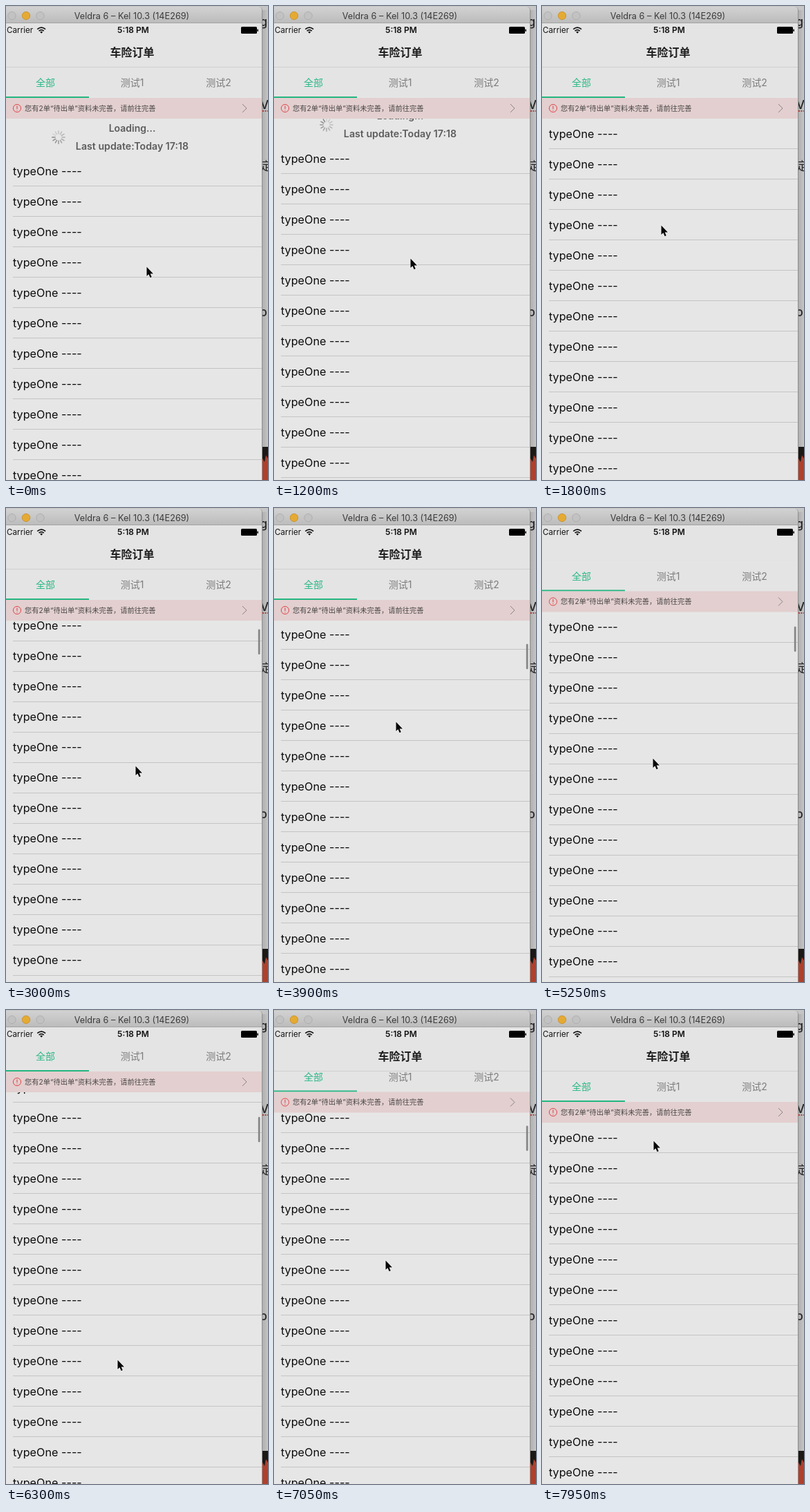
An HTML page that plays this animation: 379x686 px, repeating every 8 s.

```html
<!DOCTYPE html>
<html lang="zh">
<head>
<meta charset="utf-8">
<title>Order list</title>
<style>
html, body { margin: 0; width: 100%; height: 100%; overflow: hidden; background: #bdbdbd; }
svg { display: block; width: 100vw; height: 100vh; }
text { font-family: Inter, "Noto Sans CJK SC", "Noto Sans CJK", sans-serif; }
.mid { text-anchor: middle; }
.row { font-size: 16.2px; fill: #0c0c0c; }
.line { fill: #c4c4c4; }
.tab { font-size: 14px; fill: #7c7c7c; text-anchor: middle; }
.load { font-size: 14px; font-weight: 600; fill: #5c5c5c; text-anchor: middle; }
.behind { font-size: 17px; font-weight: 500; fill: #242424; }
</style>
</head>
<body>
<svg viewBox="0 0 379 686" preserveAspectRatio="none">
  <defs>
    <linearGradient id="bar" x2="0" y2="1">
      <stop stop-color="#d2d2d2"/><stop offset="1" stop-color="#bcbcbc"/>
    </linearGradient>
    <linearGradient id="shade">
      <stop stop-color="#acacac"/><stop offset="1" stop-color="#c5c5c5"/>
    </linearGradient>
  </defs>

  <!-- page behind the window -->
  <rect width="379" height="686" fill="#c5c5c5"/>
  <rect x="370" y="6" width="9" height="680" fill="url(#shade)"/>
  <g class="behind">
    <text x="367.5" y="29">ge</text>
    <text x="368" y="149">Vi</text>
    <text x="368" y="238">定</text>
    <text x="367.5" y="449">op</text>
  </g>
  <path d="M371 152H379" stroke="#c9382f" stroke-width="2" stroke-dasharray="2 1.5"/>
  <rect x="370" y="638" width="9" height="48" fill="#b0402c"/>
  <path d="M370 638H379V655L376 650L374 660L370 653Z" fill="#1c1815"/>

  <!-- window -->
  <path d="M0 1H365Q371 1 371 7V686H0Z" fill="#8f8f8f"/>
  <rect y="25" width="370" height="661" fill="#e6e6e6"/>

  <g id="head">
    <g id="spin"></g>
    <text class="load" x="182.5" y="128">Loading...</text>
    <text class="load" x="182.5" y="154" style="font-size:14.2px">Last update:Today 17:18</text>
  </g>
  <g id="labels"></g>
  <g id="lines"></g>
  <rect id="thumb" x="364.8" width="2.7" height="36.5" rx="1.3" fill="#858585"/>

  <rect y="25" width="370" height="64" fill="#e4e4e4"/>
  <g id="tabs">
    <rect y="88" width="370" height="45" fill="#e4e4e4"/>
    <text class="tab" x="57" y="116" style="fill:#2bb886">全部</text>
    <text class="tab" x="182.5" y="116">测试1</text>
    <text class="tab" x="307.5" y="116">测试2</text>
    <rect y="131" width="120" height="2" fill="#22b681"/>
    <rect y="133" width="370" height="30" fill="#e3cfcf"/>
    <circle cx="16" cy="148" r="5.6" fill="none" stroke="#e0484c"/>
    <path d="M16 144.6V149M16 150.4V151.6" stroke="#e0484c" stroke-width="1.1"/>
    <text x="27" y="151.8" font-size="10.25" fill="#4a4747">您有2单“待出单”资料未完善，请前往完善</text>
    <path d="M342 142L348 148L342 154" fill="none" stroke="#8b8383"/>
  </g>
  <g id="nav">
    <rect y="45" width="370" height="43" fill="#e4e4e4" fill-opacity=".95"/>
    <rect y="88" width="370" height="1" fill="#d0d0d0"/>
    <text class="mid" x="182.5" y="73" font-size="16" font-weight="700" fill="#1e1e1e">车险订单</text>
  </g>

  <!-- status bar -->
  <rect y="25" width="370" height="20" fill="#e4e4e4"/>
  <text x="1" y="39.4" font-size="11.7" fill="#151515">Carrier</text>
  <g fill="none" stroke="#111" stroke-width="1.7">
    <path d="M45.3 33.6Q51.2 28.6 57.1 33.6"/>
    <path d="M47.6 36.2Q51.2 33 54.8 36.2"/>
  </g>
  <path d="M49.2 37.6Q51.2 36 53.2 37.6L51.2 39.8Z" fill="#111"/>
  <text class="mid" x="184" y="39.4" font-size="12" font-weight="600" fill="#111">5:18 PM</text>
  <rect x="340" y="30" width="23" height="10" rx="1.5"/>
  <rect x="363.4" y="33.5" width="1.5" height="3.5" rx=".7"/>

  <!-- title bar -->
  <path d="M0 1H365Q370 1 370 6V24H0Z" fill="url(#bar)"/>
  <rect y="24" width="370" height="1" fill="#a3a3a3"/>
  <g stroke-width=".8">
    <circle cx="8.5" cy="14" r="5.7" fill="#c2c2c2" stroke="#a9a9a9"/>
    <circle cx="29" cy="14" r="5.7" fill="#e5aa32" stroke="#c68f27"/>
    <circle cx="49.5" cy="14" r="5.7" fill="#c2c2c2" stroke="#a9a9a9"/>
  </g>
  <text class="mid" x="182" y="19" font-size="12.7" fill="#3b3b3b">Veldra 6 – Kel 10.3 (14E269)</text>

  <path id="cursor" d="M.5 .5V14L3.4 11.2L5.6 16.2L7.8 15.2L5.7 10.4H10Z" fill="#080808" stroke="#f4f4f4" stroke-width="1.8" stroke-linejoin="round" paint-order="stroke"/>
</svg>
<script>
const LOOP = 8000, STEP = 150, ROW = 44, TOP = 163, PULL = 54, BAR = 44;
const $ = id => document.getElementById(id);
const move = (id, x, y) => $(id).setAttribute('transform', `translate(${x} ${y})`);
const show = (id, on) => { $(id).style.display = on ? '' : 'none'; };
const half = v => Math.round(v * 2) / 2;
const ramp = (t, from, to) => Math.min(1, Math.max(0, (t - from) / (to - from)));
const repeat = (n, part) => Array.from({ length: n }, (_, i) => part(i)).join('');

// turning points of the pointer: time, x, y
const turns = [
  [0, 203, 377], [1050, 203, 377], [1800, 172, 317], [3000, 187, 373],
  [3900, 176, 309], [5250, 160, 362], [6000, 161, 390], [6300, 161, 506], [7950, 161, 189]
];

function pointer(t) {
  const i = Math.max(1, turns.findIndex(k => k[0] >= t));
  const [t0, x0, y0] = turns[i - 1], [t1, x1, y1] = turns[i];
  const p = ramp(t, t0, t1);
  return [x0 + (x1 - x0) * p, y0 + (y1 - y0) * p].map(Math.round);
}

// swipe up, drag back, flick up, drag to the top
const scrollAt = t => half(
  442 * ramp(t, 2100, 3900) ** 1.593 - 178 * ramp(t, 3900, 5250) +
  299 * ramp(t, 5250, 5700) - 563 * ramp(t, 6000, 7800));

const shiftAt = t => half(BAR * (ramp(t, 6450, 7350) - ramp(t, 5070, 5700)));

$('labels').innerHTML = repeat(14, i =>
  `<text class="row" x="10" y="${TOP + i * ROW + 28}">typeOne ----</text>`);
$('lines').innerHTML = repeat(14, i =>
  `<rect class="line" x="10" y="${TOP + i * ROW + 43}" width="360" height="1"/>`);
$('spin').innerHTML = repeat(12, i =>
  `<path d="M0 -5V-9.2" transform="rotate(${i * 30})" stroke="#707070"
    stroke-width="1.6" stroke-linecap="round" opacity="${0.18 + 0.055 * i}"/>`);

function draw(now) {
  const t = Math.floor(now % LOOP / STEP) * STEP;
  const pull = Math.round(PULL * (1 - ramp(t, 1050, 1500)));
  const scroll = scrollAt(t), shift = shiftAt(t);
  const y = shift + pull - scroll % ROW;

  move('labels', 0, Math.floor(y));
  move('lines', 0, Math.ceil(y));
  move('head', 0, pull);
  show('head', pull > 0);
  const turn = Math.floor(t * 12 / 1000) * 30 - 60;
  $('spin').setAttribute('transform', `translate(76 136) rotate(${turn})`);

  move('thumb', 0, TOP + 2 + shift + scroll * 0.072);
  show('thumb', scroll > 0);
  move('tabs', 0, shift);
  show('nav', t < 5100 || t >= 6900);
  move('cursor', ...pointer(t));
}

function tick() {
  draw(performance.now());
  requestAnimationFrame(tick);
}
tick();
</script>
</body>
</html>
```
